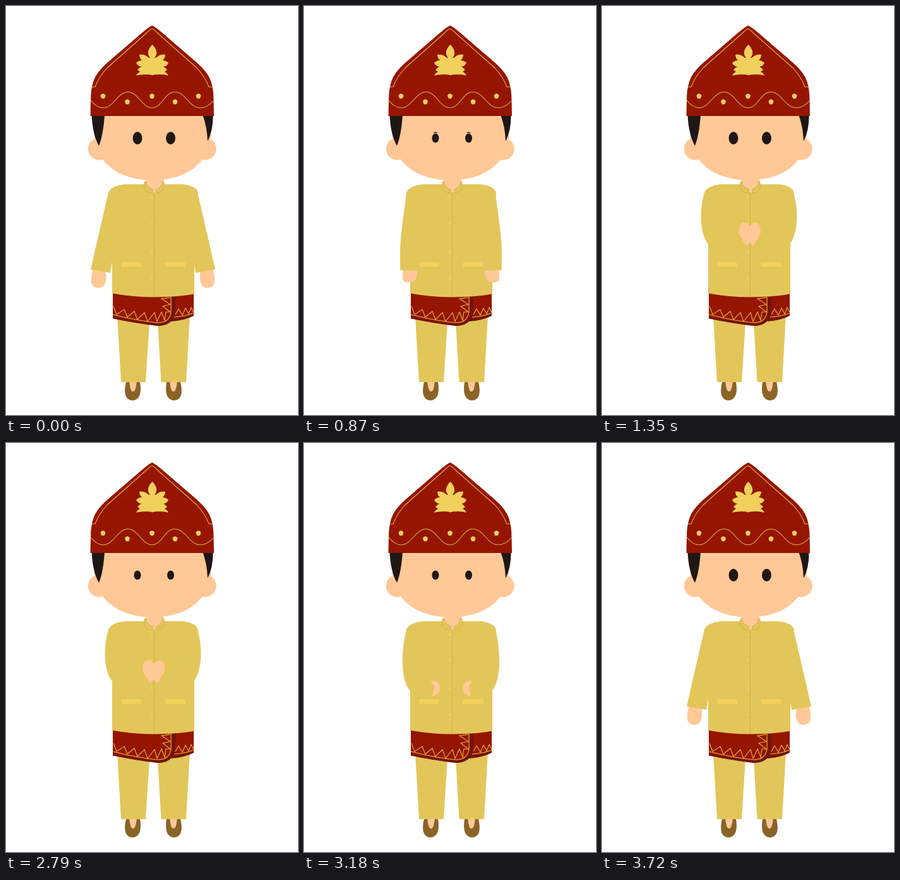
An HTML page for the animation above (3.75 s loop, 462 px wide and 647 px high).

```html
<!DOCTYPE html>
<html lang="en">
<head>
<meta charset="utf-8">
<title>Greeting</title>
<style>
html, body { margin: 0; width: 100%; height: 100%; overflow: hidden; background: #fff; }
svg { display: block; width: 100vw; height: 100vh; }
.red { fill: #951500; }
.dark { fill: #6f1410; }
.skin { fill: #ffc896; }
.ink { fill: #1f1715; }
.cloth { fill: #e3c65a; }
.gold { fill: #f1d15c; }
.shoe { fill: #8a6427; }
.trim { fill: none; stroke: #e0b545; stroke-width: 1.1; }
.seam { stroke: #d3b246; stroke-width: 1; }
.pocket { fill: #f1d15c; stroke: #e3c04c; }
</style>
</head>
<body>
<svg viewBox="0 0 462 647">
  <defs>
    <g id="foot">
      <path class="shoe" d="M190 595C187 607 186 623 200 624C214 623 214 607 212 595Z"/>
      <path class="skin" d="M195 593H207C206 601 205 610 201 610C197 610 196 601 195 593Z"/>
    </g>
    <path id="flower" class="gold" d="M0-4L2.400-3 4-1 3.200 2 2 4H-2L-3.200 2-4-1-2.400-3Z"/>
    <path id="leaf" d="M233 82H226Q220 76 211 77Q211 82 215 86Q210 86 206 90Q208 95 214 96Q210 98 208 101L212 104Q208 106 206 110Q219 107 233 109.500Z"/>
    <path id="cap" d="M232 31H231Q226 33 211 46L160 90Q142 106 138 120Q134 132 134 150L133.500 174H232Z"/>
    <path id="piping" d="M136 128H141Q147 112 160 98L222 43Q229 36 231 36"/>
  </defs>

  <use href="#foot"/>
  <use href="#foot" transform="matrix(-1 0 0 1 466 0)"/>
  <path class="cloth" d="M176 490L227 500L221 595L182 595ZM240 500L291 488L285 595L245.500 595Z"/>

  <path class="dark" d="M262 452L297 450V490Q284 497 262 499Z"/>
  <path class="red" d="M262 452L297 450V487Q284 493 262 495Z"/>
  <path class="trim" d="M266 492Q284 491 296 486M268 488L273 479L279 489L284 478L289 487L293 477L297 485"/>
  <path class="dark" d="M169 450H269L267 488Q263 506 239 506Q205 502 169 494.500Z"/>
  <path class="red" d="M169 450H263V486Q260 502 240 503Q205 499 169 491.500Z"/>
  <path class="trim" d="M169 488Q208 498 240 501Q259 501 261 484V460"/>
  <path class="trim" d="M170 475L175 488L187 480L192 492L203 483L208 496L219 485L224 499L235 485L239 499L246 484L251 497L253 484L260 484L248 475L260 472L246 463L260 461"/>

  <path class="cloth" d="M190 282H279Q300 284 304 295L298 330V455.500Q270 460.500 235 460.500Q200 460.500 168 454.500V330L162 295Q167 284 190 282Z"/>
  <path class="seam" d="M234.500 294V460"/>
  <g id="buttons"></g>
  <rect class="pocket" x="181.500" y="404.500" width="33" height="9"/>
  <rect class="pocket" x="250.500" y="404.500" width="34" height="9"/>

  <g id="arms"></g>

  <path class="skin" d="M221 270H249V280L244 287L238 290V295H232V290L225 287L221 280Z"/>
  <g class="cloth seam">
    <path d="M220 277C217 284 218 291 224 294Q228 296 232 295V290C226 288 222 284 222 279Z"/>
    <path d="M249 277C252 284 250 291 245 294Q242 296 238 295V290C244 288 247 284 247 279Z"/>
  </g>

  <g class="skin">
    <circle cx="147.500" cy="226" r="17.700"/>
    <circle cx="315" cy="226" r="17.700"/>
    <path d="M145 173H320L324 205V215C314 255 279 275.500 232 275.500C185 275.500 150 255 140 215V205Z"/>
  </g>
  <path class="ink" d="M135.500 172H156Q154 204 147 221Q137 204 135.500 172ZM311 172H327.500Q328 196 319 214Q318 190 311 172Z"/>
  <g id="eyes" class="ink"></g>

  <g class="red">
    <use href="#cap"/>
    <use href="#cap" transform="matrix(-1 0 0 1 462.500 0)"/>
  </g>
  <g class="trim">
    <use href="#piping"/>
    <use href="#piping" transform="matrix(-1 0 0 1 462 0)"/>
    <path d="M134 149C140 157 146 161 154 161C170 161 177 136 193 136C209 136 215 161 231 161C247 161 251 136 267 136C284 136 290 161 307 161Q319 161 328 150"/>
  </g>
  <g class="gold">
    <path d="M231.500 61C226 67 221 75 229 83H234C242 75 237 67 231.500 61Z"/>
    <use href="#leaf"/>
    <use href="#leaf" transform="matrix(-1 0 0 1 463 0)"/>
  </g>
  <g id="flowers"></g>
</svg>
<script>
const LOOP = 3750;
const NS = 'http://www.w3.org/2000/svg';
const $ = id => document.getElementById(id);

function add(parent, tag, attrs) {
  const el = document.createElementNS(NS, tag);
  for (const k in attrs) el.setAttribute(k, attrs[k]);
  return $(parent).appendChild(el);
}

// Left arm poses; the right arm mirrors them about half of "span".
const pose = (sleeve, hand, span) => ({
  sleeve: 'M190 282Q167 284 162 295' + sleeve + 'Z', hand: hand + 'Z', span
});
const rest = pose('C155 325 148 355 141 386L134 417L165 422L170 393',
  'M138 414C134 428 134 438 137 442C142 447 150 447 154 443C157 440 159 433 158 428C158 424 158 422 157 416', 465);
const swing = pose('C159 325 153 355 152 386L152 418L181 419L185 370',
  'M158 413C155 424 155 432 157 435C161 438 167 438 171 437C176 436 179 428 179 422C179 420 179 418 178 413', 465);
const fore = pose('C156 321 148 350 149 386L149 412L178 415L185 370',
  'M157 409C154 418 154 421 157 424C160 427 166 427 171 426C176 425 179 420 178 416C178 415 178 414 177 409', 465);
const waist = pose('C154 328 152 375 168 392L202 400L200 376L185 350',
  'M203 400C206 401 212 398 214 394C216 391 216 385 214 381C211 376 205 375 201 376.5C200 378 207 382 206 388', 467);
const pray = pose('C154 322 154 358 168 377L214 372L214 350L185 340',
  'M228 379.5C230 379 232 376 234 374C234.5 366 234.5 356 234 349C232 344 227 342 222 343.5C216 346 218 352 216 359', 467.5);

const linear = p => p;
const easeIn = p => p ** 1.5;
const easeOut = p => 1 - (1 - p) ** 1.5;

// [time, pose, easing towards the next key]
const keys = [
  [0, rest, linear], [450, rest, easeIn], [870, swing, linear], [1050, waist, easeOut],
  [1350, pray, linear], [2760, pray, easeIn], [3180, waist, linear],
  [3480, fore, easeOut], [3720, rest, linear], [LOOP, rest, linear]
];

const mix = (a, b, p) => a + (b - a) * p;
function mixPath(a, b, p) {
  const to = b.match(/[\d.]+/g);
  let i = 0;
  return a.replace(/[\d.]+/g, n => mix(+n, +to[i++], p).toFixed(2));
}

for (const y of [303, 344, 388, 430]) add('buttons', 'circle', { cx: 230.5, cy: y, r: 1.8, class: 'gold' });
for (const [x, y] of [[153.5, 142.5], [192, 151.5], [231, 142.5], [267.5, 151.5], [304.5, 142.5]])
  add('flowers', 'use', { href: '#flower', transform: `translate(${x} ${y})` });

const eyes = [208, 260.5].map(x => ({
  ball: add('eyes', 'ellipse', { cx: x, cy: 209 }),
  lid: add('eyes', 'path', { d: `M${x - 3.5} 201Q${x} 197.500 ${x + 3.5} 201Z` })
}));
const arms = [0, 1].map(() => ({
  hand: add('arms', 'path', { class: 'skin' }),
  sleeve: add('arms', 'path', { class: 'cloth' })
}));

function draw(t) {
  const i = keys.findIndex((k, n) => n === keys.length - 2 || t < keys[n + 1][0]);
  const [t0, a, ease] = keys[i];
  const [t1, b] = keys[i + 1];
  const p = ease((t - t0) / (t1 - t0));
  const sleeve = mixPath(a.sleeve, b.sleeve, p);
  const hand = mixPath(a.hand, b.hand, p);
  arms.forEach((arm, right) => {
    arm.sleeve.setAttribute('d', sleeve);
    arm.hand.setAttribute('d', hand);
    if (right) {
      arm.sleeve.setAttribute('transform', 'matrix(-1 0 0 1 465 0)');
      arm.hand.setAttribute('transform', `matrix(-1 0 0 1 ${mix(a.span, b.span, p)} 0)`);
    }
  });

  const rising = t >= 480 && t < 990;
  const small = rising || (t >= 2790 && t < 3300);
  for (const { ball, lid } of eyes) {
    ball.setAttribute('rx', small ? 5.5 : 7.5);
    ball.setAttribute('ry', small ? 7.3 : 10);
    lid.setAttribute('visibility', rising ? 'visible' : 'hidden');
  }
}

const start = performance.now();
function tick() {
  draw((performance.now() - start) % LOOP);
  requestAnimationFrame(tick);
}
tick();
</script>
</body>
</html>
```
